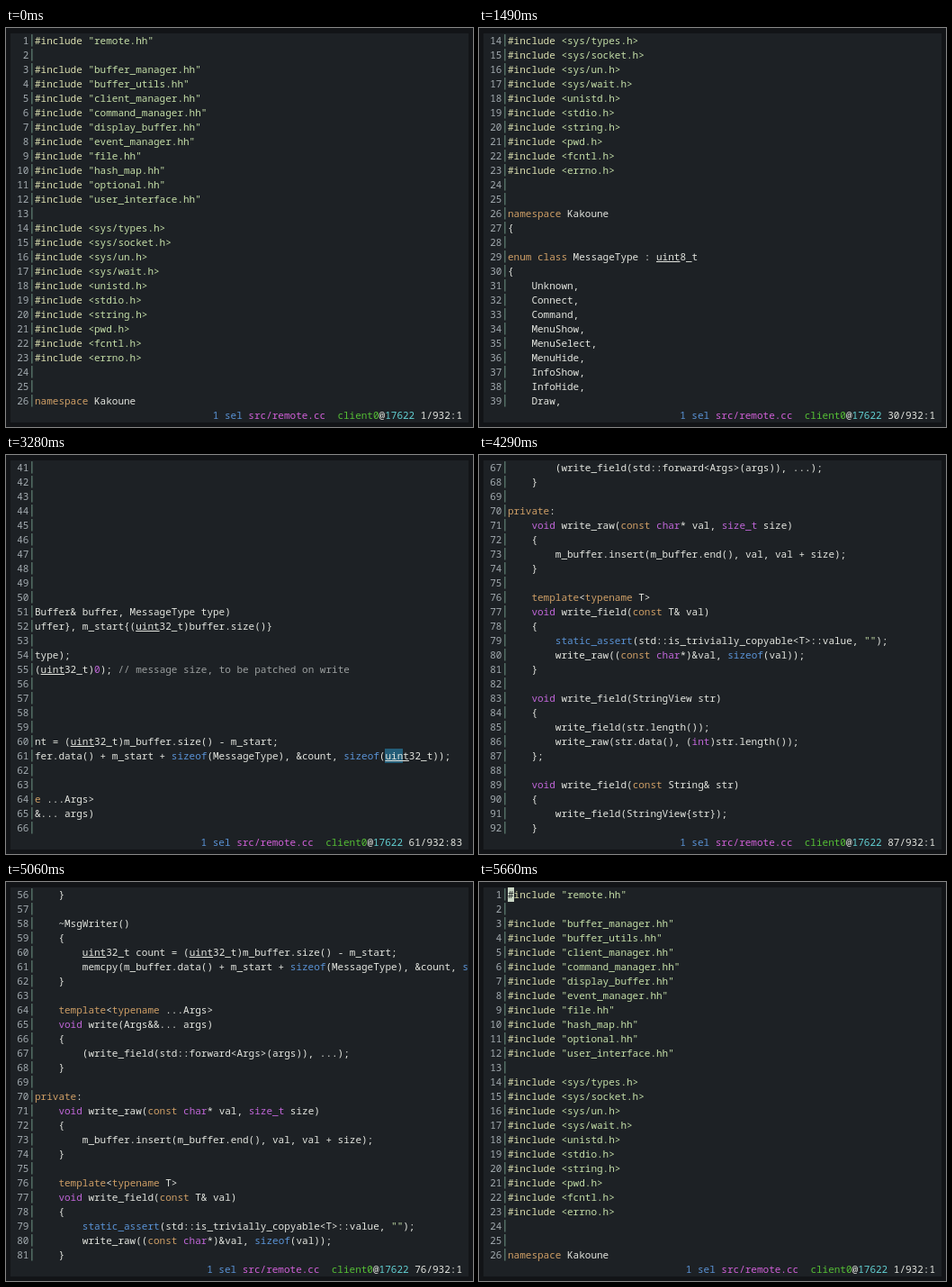
These frames come from a looping animation (519 by 443 pixels, 6090 ms). An HTML page:

```html
<!DOCTYPE html>
<html lang="en">
<head>
<meta charset="utf-8">
<title>Smooth scrolling in a text editor</title>
<style>
html, body { margin: 0; width: 100%; height: 100%; overflow: hidden; background: #121417; }
#pane {
  position: absolute; left: 5px; top: 6px; width: 509px; height: 432px;
  overflow: hidden; background: #1d2125; color: #e4e6e0;
  font: 11px/16px "Noto Sans Mono", "DejaVu Sans Mono", monospace;
  font-variant-ligatures: none; white-space: pre;
}
#view { position: absolute; left: 0; top: 0; width: 509px; height: 416px; overflow: hidden; }
#gutter { position: absolute; left: .6px; top: 0; color: #a3abb0; }
#clip { position: absolute; left: 27px; top: 0; width: 482px; height: 416px; overflow: hidden; }
#code { position: absolute; left: 0; top: 0; }
#text { position: relative; }
#gutter div, #text div { height: 16px; }
#mark { position: absolute; height: 16px; background: #235d78; }
#block { position: absolute; left: 0; width: 6.6px; height: 16px; background: #c9d6c4; color: #1d2125; }
#prompt { position: absolute; left: .6px; top: 416px; }
#status { position: absolute; right: 7px; top: 416px; }
.bar { color: #86b5a0; }
.meta { color: #dbdfb0; }
.str { color: #c5dfa8; }
.key { color: #cf9f66; }
.type { color: #c066d8; }
.fn, .mode { color: #5a93d6; }
.note { color: #9b9f9f; }
.file { color: #d160d8; }
.client { color: #55bf35; }
.pid { color: #62d0d2; }
.found .hit { text-decoration: underline; }
</style>
</head>
<body>
<div id="pane">
  <div id="view">
    <div id="gutter"></div>
    <div id="clip"><div id="code"><div id="mark"></div><div id="text"></div><div id="block">#</div></div></div>
  </div>
  <div id="prompt"></div>
  <div id="status"><span class="mode" id="mode"></span> <span class="file">src/remote.cc</span>  <span class="client">client0</span>@<span class="pid">17622</span> <span id="pos"></span></div>
</div>
<script>
const source = String.raw`#include "remote.hh"

#include "buffer_manager.hh"
#include "buffer_utils.hh"
#include "client_manager.hh"
#include "command_manager.hh"
#include "display_buffer.hh"
#include "event_manager.hh"
#include "file.hh"
#include "hash_map.hh"
#include "optional.hh"
#include "user_interface.hh"

#include <sys/types.h>
#include <sys/socket.h>
#include <sys/un.h>
#include <sys/wait.h>
#include <unistd.h>
#include <stdio.h>
#include <string.h>
#include <pwd.h>
#include <fcntl.h>
#include <errno.h>


namespace Kakoune
{

enum class MessageType : uint8_t
{
    Unknown,
    Connect,
    Command,
    MenuShow,
    MenuSelect,
    MenuHide,
    InfoShow,
    InfoHide,
    Draw,
    DrawStatus,
    SetCursor,
    Refresh,
    SetOptions,
    Exit,
    Key,
};

class MsgWriter
{
public:
    MsgWriter(RemoteBuffer& buffer, MessageType type)
        : m_buffer{buffer}, m_start{(uint32_t)buffer.size()}
    {
        write_field(type);
        write_field((uint32_t)0); // message size, to be patched on write
    }

    ~MsgWriter()
    {
        uint32_t count = (uint32_t)m_buffer.size() - m_start;
        memcpy(m_buffer.data() + m_start + sizeof(MessageType), &count, sizeof(uint32_t));
    }

    template<typename ...Args>
    void write(Args&&... args)
    {
        (write_field(std::forward<Args>(args)), ...);
    }

private:
    void write_raw(const char* val, size_t size)
    {
        m_buffer.insert(m_buffer.end(), val, val + size);
    }

    template<typename T>
    void write_field(const T& val)
    {
        static_assert(std::is_trivially_copyable<T>::value, "");
        write_raw((const char*)&val, sizeof(val));
    }

    void write_field(StringView str)
    {
        write_field(str.length());
        write_raw(str.data(), (int)str.length());
    };

    void write_field(const String& str)
    {
        write_field(StringView{str});
    }

    template<typename T>
    void write_field(ConstArrayView<T> view)
    {
        write_field<uint32_t>(view.size());
        for (auto& val : view)
            write_field(val);
    }

    template<typename T, MemoryDomain domain>`;

const CELL = 6.6, ROW = 16, LOOP = 6090, SCROLLOFF = 5, SAMPLE = 27.5;
const $ = id => document.getElementById(id);
const escape = s => s.replace(/&/g, "&amp;").replace(/</g, "&lt;").replace(/>/g, "&gt;");

// One capture group per class, in this order
const classes = ["note", "meta", "str", "key", "type", "fn", "hit"];
const tokens = new RegExp([
  String.raw`(\/\/.*)`,
  String.raw`(#include)`,
  String.raw`("[^"]*"|<[\w\/]+\.h>)`,
  String.raw`\b(namespace|enum|class|public|private|template|typename|const|for|auto)\b`,
  String.raw`\b(void|char|int|size_t|0)\b`,
  String.raw`\b(sizeof|static_assert)\b`,
  String.raw`(uint)(?=\d)`,
  "[<>&]"
].join("|"), "g");

function paint(line) {
  return line.replace(tokens, (all, ...groups) => {
    const i = groups.slice(0, classes.length).findIndex(g => g !== undefined);
    return i < 0 ? escape(all) : `<span class="${classes[i]}">${escape(all)}</span>`;
  });
}

const lines = source.split("\n");
$("text").innerHTML = lines.map(l => `<div>${paint(l)}</div>`).join("");
$("gutter").innerHTML = lines.map((_, i) =>
  `<div>${String(i + 1).padStart(3)}<span class="bar">│</span></div>`).join("");

// Each event changes the state; those with dur scroll to the new top first
const start = { top: 1, line: 1, col: 1, shift: 0, mode: "1 sel", prompt: null, block: false, sel: false, found: false };
const events = [
  { at: 340, dur: 130, lag: 0, top: 13, line: 18, block: true },
  { at: 840, mode: "prompt", prompt: "" },
  { at: 890, prompt: "uint" },
  { at: 1140, mode: "1 sel", prompt: null, line: 29, col: 29, block: false, sel: true, found: true },
  { at: 1490, dur: 200, lag: 0, top: 32, line: 52, col: 41 },
  { at: 2120, dur: 30, lag: 12, top: 35, line: 55, col: 25 },
  { at: 2520, dur: 50, lag: 10, top: 40, line: 60, col: 12 },
  { at: 2960, col: 30 },
  { at: 3280, top: 41, line: 61, col: 83, shift: 20 },
  { at: 4180, dur: 370, lag: 28, top: 77, line: 97, col: 24, shift: 0 },
  { at: 4840, mode: "enter key" },
  { at: 5000, dur: 660, lag: -1.5, top: 1, line: 1, col: 1, mode: "1 sel", sel: false, block: true }
];

// Inertial scroll: the wait after each line grows as 1 / lines left
function linesDone(n, dur, t) {
  let sum = 0;
  for (let k = 2; k <= n; k++) sum += 1 / k;
  let done = 1, next = 0;
  while (done < n) {
    next += dur / sum / (n - done + 1);
    if (next > t) break;
    done++;
  }
  return done;
}

function stateAt(t) {
  let s = start;
  for (const e of events) {
    if (t < e.at) break;
    const end = { ...s, ...e };
    const age = t - e.at;
    if (e.dur && age < e.dur) {
      const shown = Math.floor(Math.floor(age / 10) * 10 / SAMPLE) * SAMPLE;
      const span = e.top - s.top;
      const top = s.top + Math.sign(span) * linesDone(Math.abs(span), e.dur, shown + e.lag);
      const row = Math.max(SCROLLOFF, s.line - s.top);
      return { ...end, top, line: top + row, col: 1, sel: false, block: false };
    }
    s = end;
    delete s.dur;
  }
  return s;
}

function draw() {
  const s = stateAt(performance.now() % LOOP);
  const y = -(s.top - 1) * ROW;
  $("gutter").style.transform = `translateY(${y}px)`;
  $("code").style.transform = `translate(${-s.shift * CELL}px, ${y}px)`;
  $("text").className = s.found ? "found" : "";

  const lineY = (s.line - 1) * ROW + "px";
  const mark = $("mark").style, block = $("block").style;
  mark.display = s.sel ? "" : "none";
  mark.top = lineY;
  mark.left = (s.col - 4) * CELL + "px";
  mark.width = 3 * CELL + "px";
  block.display = s.block ? "" : "none";
  block.top = lineY;

  $("mode").textContent = s.mode;
  $("pos").textContent = `${s.line}/932:${s.col}`;
  $("prompt").innerHTML = s.prompt === null ? "" : `<span class="key">search:</span>${s.prompt}`;
  requestAnimationFrame(draw);
}
draw();
</script>
</body>
</html>
```
